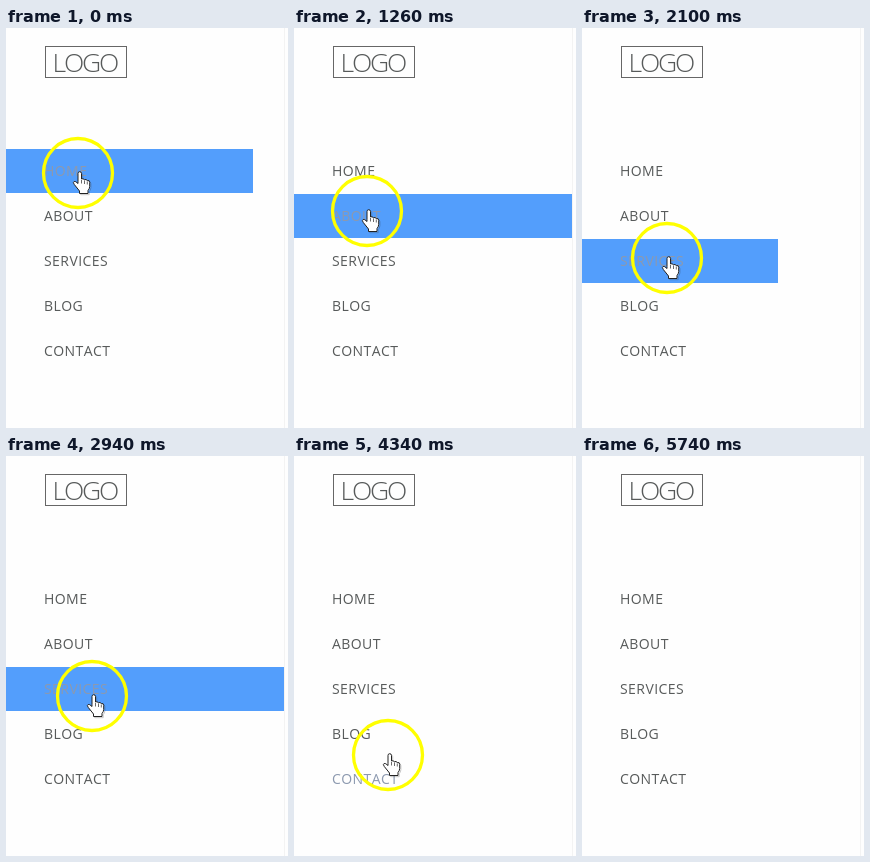
Animation of 282x400 px, one loop 6.11 s. Source, as an HTML page:

```html
<!DOCTYPE html>
<html lang="en">
<head>
<meta charset="utf-8">
<title>Side menu hover</title>
<style>
  html, body { margin: 0; width: 100%; height: 100%; overflow: hidden; background: #fefefe; }
  svg { display: block; width: 282px; height: 400px; }
  text { font-family: "Open Sans", "Noto Sans", sans-serif; font-kerning: none; fill: #575a5a; }
  .item { font-size: 14px; letter-spacing: .43px; }
  .item.on { fill: #8c99af; }
  .logo { font-size: 26.5px; font-weight: 350; letter-spacing: -2.1px; }
</style>
</head>
<body>
<svg viewBox="0 0 282 400">
  <rect width="282" height="400" fill="#fefefe"/>
  <path d="M278.5 0V400" stroke="#f3f3f3"/>
  <rect x="39.5" y="18.5" width="81" height="31" fill="none" stroke="#666"/>
  <text class="logo" x="46.4" y="44">LOGO</text>
  <rect id="bar" height="44" fill="#539efc"/>
  <g id="menu"></g>
  <g id="pointer">
    <circle r="34.5" fill="none" stroke="#ff0" stroke-width="3.3"/>
    <g transform="translate(-.5 -.5)" stroke-linejoin="round">
      <use href="#hand" x="1.2" y="1.2" opacity=".25"/>
      <path id="hand" fill="#fff" stroke="#222" d="M.5 9V1Q.5 -.8 2.2 -.8T4 1V6.5
        Q5.4 5.6 7 7.2Q8.6 6.4 9.8 8Q12.2 7.4 12.2 10V14Q12 16.5 10.5 18V21H2V18.5
        L-3.2 12Q-5 9.6 -3.4 9Q-2 8.4 .5 11Z"/>
      <path d="M4 7.5V11M7 8V11.5M9.8 9V12" stroke="#444" stroke-width=".8"/>
    </g>
  </g>
</svg>
<script>
const LOOP = 6110, STEP = 140, GONE = 5740;
const ROW_TOP = 121, ROW_GAP = 45, FULL = 278, GROW = 360;
const labels = ["HOME", "ABOUT", "SERVICES", "BLOG", "CONTACT"];

// One glide per menu item, then one that leaves the menu.
const glides = [
  { from: -480, to: 0, x: 72, y: 145 },
  { from: 420, to: 1260, x: 73, y: 183 },
  { from: 1680, to: 2190, x: 85.55, y: 234.7 },
  { from: 2795, to: 3500, x: 94, y: 279 },
  { from: 3920, to: 4760, x: 94, y: 318 },
  { from: 5180, to: 6020, x: 94, y: 384 }
];

const $ = id => document.getElementById(id);
const clamp = v => Math.min(1, Math.max(0, v));
const smooth = u => u * u * (3 - 2 * u);
const easeOut = u => 1 - (1 - u) ** 2;
const middle = g => (g.from + g.to) / 2;

const items = labels.map((label, i) => {
  const el = document.createElementNS("http://www.w3.org/2000/svg", "text");
  el.setAttribute("class", "item");
  el.setAttribute("x", 38);
  el.setAttribute("y", ROW_TOP + i * ROW_GAP + 27);
  el.textContent = label;
  return $("menu").appendChild(el);
});

function pointerAt(t) {
  let { x, y } = glides[0];
  for (const g of glides) {
    const k = smooth(clamp((t - g.from) / (g.to - g.from)));
    x += (g.x - x) * k;
    y += (g.y - y) * k;
  }
  return [Math.round(x), Math.round(y)];
}

function draw(ms) {
  const t = Math.floor((ms % LOOP) / STEP) * STEP;
  // The pointer crosses into the next row halfway through each glide.
  const row = glides.filter(g => middle(g) <= t).length - 1;
  const grown = row < labels.length ? easeOut(clamp((t - middle(glides[row])) / GROW)) : 0;
  $("bar").setAttribute("y", ROW_TOP + row * ROW_GAP);
  $("bar").setAttribute("width", Math.round(FULL * grown));
  items.forEach((el, i) => el.classList.toggle("on", i === row));
  $("pointer").style.display = t < GONE ? "" : "none";
  $("pointer").setAttribute("transform", `translate(${pointerAt(t)})`);
}

let start;
function tick(now) {
  start ??= now;
  draw(now - start);
  requestAnimationFrame(tick);
}
draw(0);
requestAnimationFrame(tick);
</script>
</body>
</html>
```
